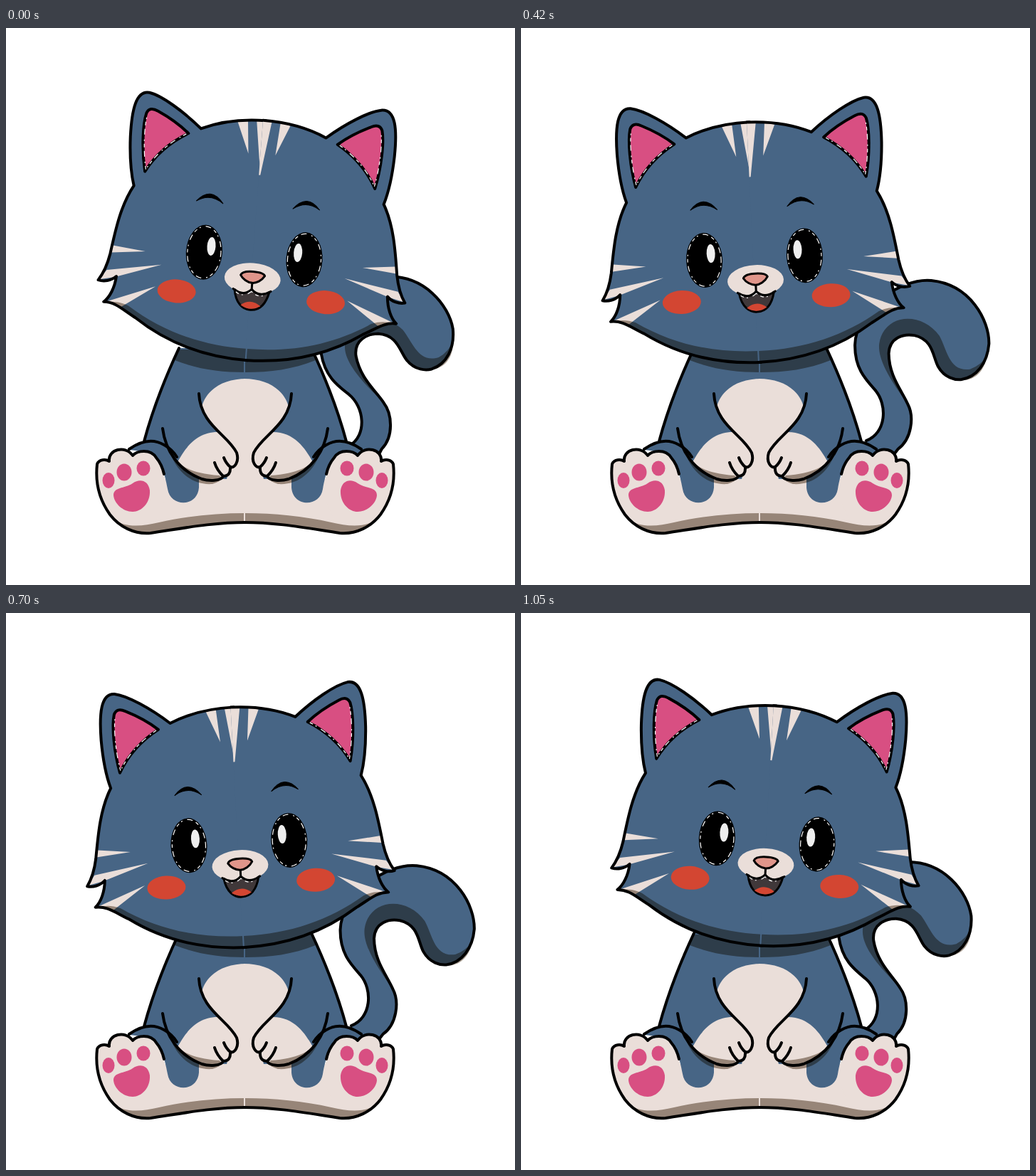
Recreate the animation shown at these times as an HTML page. Size 715 by 783 pixels, loop 1120 ms.

```html
<!DOCTYPE html>
<html lang="en">
<head>
<meta charset="utf-8">
<title>Swaying kitten</title>
<style>
  html, body { margin: 0; width: 100%; height: 100%; overflow: hidden; background: #fff; }
  svg { display: block; width: 100vw; height: 100vh; }
  .blue { fill: #476585; }
  .cream { fill: #eaded9; }
  .pink { fill: #d84f82; }
  .red { fill: #d34632; }
  .line { stroke: #000; stroke-width: 4; stroke-linecap: round; stroke-linejoin: round; }
  .thin { stroke-width: 3; }
  .bare { fill: none; }
  .shade { fill: #a5998d; mix-blend-mode: multiply; }
  .spark { fill: none; stroke: #fff; stroke-width: 1.2; stroke-dasharray: 5 4 2 7 8 5; }
</style>
</head>
<body>
<svg viewBox="0 0 715 783">
  <defs>
    <!-- left halves, mirrored about x = 336; fills overlap the axis a little -->
    <g id="body">
      <path class="blue" d="M338,450H243C222,495 205,540 194,581V600L240,640H338Z"/>
      <path class="cream" d="M338,493C305,493 282,508 275,532Q285,556 322,592L310,634H222V650L203,710C250,703 290,695 338,695Z"/>
      <path class="blue" d="M173,593Q200,572 224,588Q236,598 245,615L271,630V646C269,674 231,674 227,648C223,625 216,605 208,597Z"/>
      <path class="line bare" d="M243,450C222,495 205,540 194,581M173,592Q200,573 222,586Q233,592 240,603"/>
      <path class="cream" d="M203,710C180,712 159,701 146,684C131,663 125,640 128,613C131,606 140,606 145,609C143,592 168,586 178,601C184,594 203,591 211,604C219,614 222,624 224,640L227,656Z"/>
      <path class="shade" d="M150,689C165,703 190,701 215,695C255,686 295,682 336,682V695C290,695 250,703 203,710C180,711 162,703 150,689Z"/>
      <path class="line bare" d="M338,695C290,695 250,703 203,710C180,712 159,701 146,684C131,663 125,640 128,613C131,606 140,606 145,609C143,592 168,586 178,601C184,594 203,591 211,604C217,611 220,618 222,627"/>
      <g class="pink">
        <path d="M151,657C151,645 166,648 178,640C188,633 200,636 202,650C203,668 190,680 178,680C164,680 152,668 151,657Z"/>
        <ellipse cx="144" cy="636" rx="8.500" ry="11"/>
        <ellipse cx="166" cy="624.500" rx="10.500" ry="12"/>
        <ellipse cx="193" cy="619" rx="9.500" ry="10.500"/>
      </g>
      <path class="cream" d="M299,568C268,567 252,590 241,610Q262,630 285,635Q300,636 305,630Q314,629 315,617Q326,612 324,597Q317,582 299,568Z"/>
      <path class="shade" d="M232,601C247,618 262,626 300,629Q308,636 290,641C262,643 242,625 232,601Z"/>
      <path class="line bare" d="M271,514C273,558 312,572 324,597C328,610 321,619 315,617Q309,612 306,604Q309,612 315,617Q316,630 305,630Q296,621 293,611Q296,621 305,630C303,637 285,637 275,634C243,622 224,595 220,563"/>
      <path class="shade" d="M242,452L237,467C270,480 300,484 336,484V452Z"/>
    </g>

    <g id="head">
      <path class="blue" d="M338,132C302,132 272,139 248,150C222,128 190,108 172,105C153,103 149,131 150,169C151,195 154,218 160,237C144,265 139,300 134,335C131,352 126,364 120,373C128,375 138,373 145,366C144,382 138,396 130,403C146,402 156,411 176,422C226,456 280,470 338,470Z"/>
      <path class="cream" d="M338,131H325L336,209H338ZM299,137L313,133L317,180ZM137,323L183,328L135,333ZM131,358L207,345L143,367L121,372ZM132,403L201,376L154,409Z"/>
      <path class="shade" d="M130,403C146,402 156,411 176,422C226,456 280,470 336,470V454C270,454 215,438 165,406C150,400 142,402 130,403Z"/>
      <path class="line bare" d="M338,132C302,132 272,139 248,150C222,128 190,108 172,105C153,103 149,131 150,169C151,195 154,218 160,237C144,265 139,300 134,335C131,352 126,364 120,373C128,375 138,373 145,366C144,382 138,396 130,403C146,402 156,411 176,422C226,456 280,470 338,470"/>
      <path class="pink line" d="M174,216C167,185 166,150 170,134Q174,124 186,130Q212,142 231,158Q193,180 174,216Z"/>
      <path class="spark" d="M175,213C169,185 168,150 172,134M228,159Q193,180 175,213"/>
      <path d="M249,252Q268,229 287,253Q268,239 249,252Z" stroke="#000"/>
      <ellipse cx="265.500" cy="323" rx="25.500" ry="38.500"/>
      <ellipse class="spark" cx="265.500" cy="323" rx="23.500" ry="36.500"/>
      <ellipse cx="275" cy="314" rx="6" ry="13" fill="#eee"/>
      <ellipse class="red" cx="231" cy="380.500" rx="27" ry="16.500"/>
    </g>
  </defs>

  <g id="tail">
    <path class="blue line" d="M484,582C512,570 512,530 493,510C478,495 463,480 462,448C461,400 520,351 565,353C620,356 649,405 650,438C649,465 635,486 613,490C605,491 590,489 580,473C572,460 572,436 545,431C530,429 510,435 510,458C512,490 530,508 540,528C550,545 548,577 529,592L515,612H488"/>
    <path class="shade" d="M541,530C525,508 494,472 496,445C500,403 552,395 580,430C592,450 596,480 625,475Q640,469 648,455C645,480 630,491 613,491C590,492 582,478 576,460C566,436 548,430 536,431C515,435 508,446 511,465C514,490 530,508 541,530Z"/>
  </g>

  <use href="#body"/>
  <use href="#body" transform="matrix(-1 0 0 1 672 0)"/>

  <g id="face">
    <use href="#head"/>
    <use href="#head" transform="matrix(-1 0 0 1 672 0)"/>
    <ellipse class="cream" cx="336" cy="355" rx="39.500" ry="22"/>
    <path class="line thin" fill="#40383a" d="M312,372C315,391 325,399 336,399C348,399 357,391 361,372Q347,381 336,370Q325,381 312,372Z"/>
    <path class="red" d="M322,393Q336,382 350,393Q336,402 322,393Z"/>
    <path class="spark" d="M314,375Q325,383 336,373Q347,383 358,375"/>
    <path class="line thin bare" d="M336,361V370M310,371L313,373M363,371L360,373"/>
    <path class="line thin" fill="#e0958a" d="M319,351Q321,345 336,345Q351,345 353,350C349,357 342,361 336,361C329,361 322,356 319,351Z"/>
  </g>
</svg>
<script>
  const STEP = 70, COUNT = 16;
  // [step, head sway, tail angle in degrees]
  const keys = [
    [0, 1, -7.5], [4, 0, 0], [6, -.63, 2.65], [8, -1.05, 5.2], [9, -1, 4.15],
    [11, -.37, 1.5], [13, .3, -1.9], [15, .77, -6], [16, 1, -7.5]
  ];
  const face = document.getElementById('face');
  const tail = document.getElementById('tail');

  function pose(step) {
    const i = keys.findIndex(k => k[0] > step);
    const a = keys[i - 1], b = keys[i];
    const p = (step - a[0]) / (b[0] - a[0]);
    return [1, 2].map(n => a[n] + (b[n] - a[n]) * p);
  }

  function draw() {
    const step = Math.floor(performance.now() / STEP) % COUNT;
    const [sway, swing] = pose(step);
    const lift = -3 * Math.max(0, sway);
    face.setAttribute('transform', `translate(0 ${lift}) rotate(${4.3 * sway} 336 492)`);
    tail.setAttribute('transform', `rotate(${swing} 525 600)`);
    requestAnimationFrame(draw);
  }
  draw();
</script>
</body>
</html>
```
